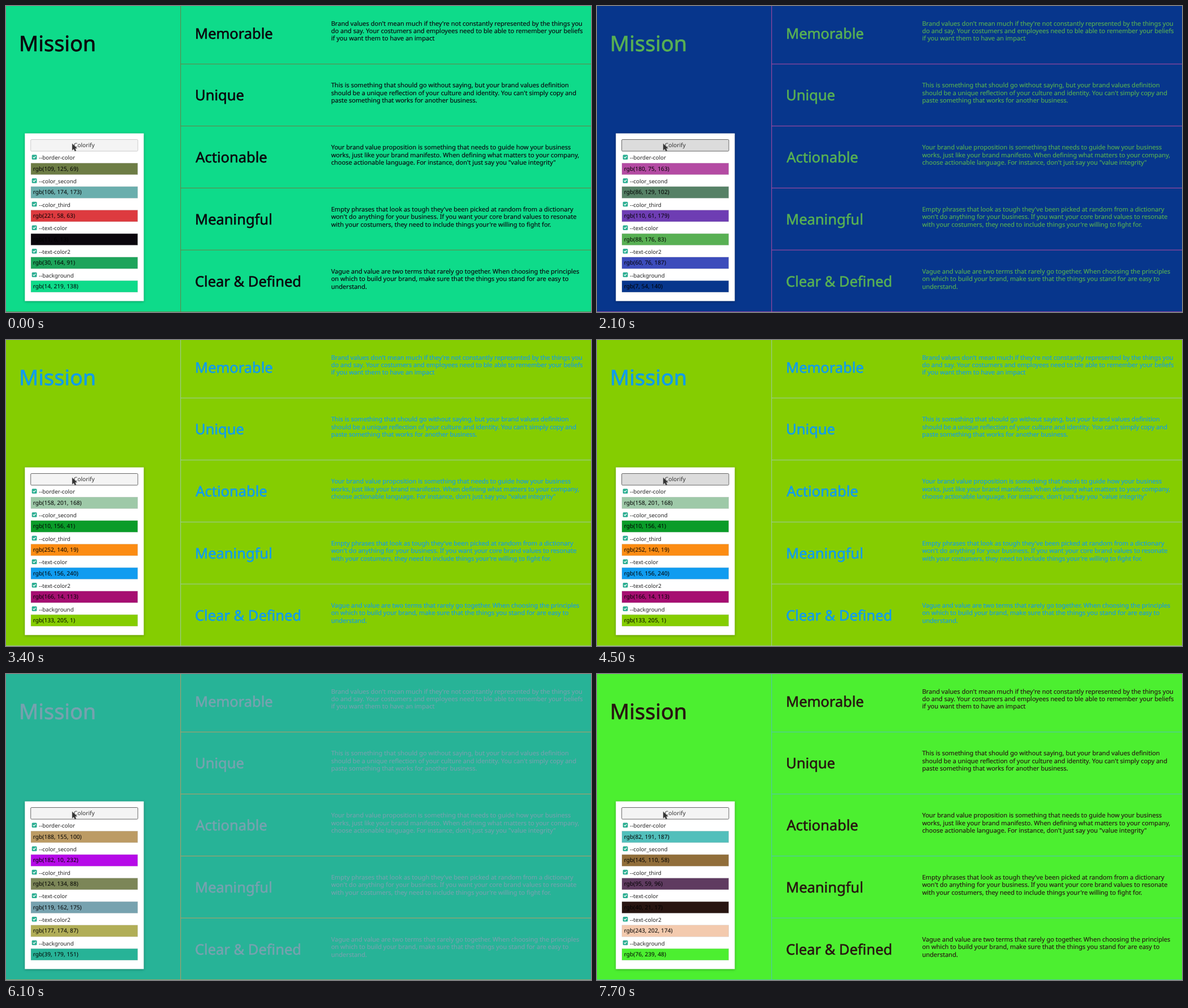
Write an HTML page that moves like this. It is 1034 px wide and 542 px high and loops after 8 s.

```html
<!DOCTYPE html>
<html lang="en">
<head>
<meta charset="utf-8">
<title>Brand values</title>
<style>
  html, body { margin: 0; width: 100%; height: 100%; overflow: hidden; }
  svg { display: block; width: 1034px; height: 542px; }
  text { font-family: "Noto Sans", "Open Sans", sans-serif; text-rendering: geometricPrecision; white-space: pre; }
  .page text { fill: var(--text); stroke: var(--text); }
  .page .heading { font-size: 25.5px; stroke-width: .6px; }
  .page .title { font-size: 37.8px; stroke-width: .7px; }
  .page .copy { font-size: 11.04px; stroke-width: .15px; }
  .rule { stroke: var(--border); fill: none; }
  .panel { fill: #fff; filter: drop-shadow(0 1px 2px rgba(0, 0, 0, .3)); }
  .label { font-size: 9.8px; fill: #222; }
  .value { font-size: 10.2px; fill: #000; }
  .swatch { stroke: rgba(190, 190, 190, .6); stroke-width: .5px; }
</style>
</head>
<body>
<svg id="stage" viewBox="0 0 1034 542"></svg>
<script>
const DURATION = 8000;
const ROW = 109.8, LINE = 13.35, FIELD = 41.65;

const sections = [
  ["Memorable",
    "Brand values don't mean much if they're not constantly represented by the things you",
    "do and say. Your costumers and employees need to ble able to remember your beliefs",
    "if you want them to have an impact"],
  ["Unique",
    "This is something that should go without saying, but your brand values definition",
    "should be a unique reflection of your culture and identity. You can't simply copy and",
    "paste something that works for another business."],
  ["Actionable",
    "Your brand value proposition is something that needs to guide how your business",
    "works, just like your brand manifesto. When defining what matters to your company,",
    "choose actionable language. For instance, don't just say you \"value integrity\""],
  ["Meaningful",
    "Empty phrases that look as tough they've been picked at random from a dictionary",
    "won't do anything for your business. If you want your core brand values to resonate",
    "with your costumers, they need to include things your're willing to fight for."],
  ["Clear & Defined",
    "Vague and value are two terms that rarely go together. When choosing the principles",
    "on which to build your brand, make sure that the things you stand for are easy to",
    "understand."]
];

const fields = ["border-color", "color_second", "color_third", "text-color", "text-color2", "background"];

// One colour per field, in the order of `fields`.
const green = ["109, 125, 69", "106, 174, 173", "221, 58, 63", "11, 6, 13", "30, 164, 91", "14, 219, 138"];
const navy = ["180, 75, 163", "86, 129, 102", "110, 61, 179", "88, 176, 83", "60, 76, 187", "7, 54, 140"];
const pink = ["37, 131, 68", "192, 136, 204", "90, 0, 105", "161, 101, 150", "223, 229, 230", "240, 154, 236"];
const lime = ["158, 201, 168", "10, 156, 41", "252, 140, 19", "16, 156, 240", "166, 14, 113", "133, 205, 1"];
const mint = ["183, 253, 96", "176, 9, 222", "104, 74, 149", "42, 122, 251", "238, 157, 97", "36, 247, 124"];
const blue = ["192, 56, 103", "188, 11, 241", "143, 194, 26", "196, 201, 99", "116, 190, 77", "41, 111, 178"];
const neon = ["82, 191, 187", "145, 110, 58", "95, 59, 96", "40, 21, 17", "243, 202, 174", "76, 239, 48"];

function blend(a, b) {
  const parse = color => color.split(",").map(Number);
  return a.map((color, i) => {
    const other = parse(b[i]);
    return parse(color).map((v, k) => Math.round((v + other[k]) / 2)).join(", ");
  });
}
const teal = blend(mint, blue);

// Start time, palette, whether the button is held down.
const steps = [
  [0, green, false],
  [800, green, true], [900, navy, false],
  [2100, navy, true], [2200, pink, false],
  [3400, lime, false],
  [4500, lime, true], [4600, mint, false],
  [5600, mint, true], [6100, teal, false],
  [6600, teal, true], [6700, blue, false],
  [7600, blue, true], [7700, neon, false]
];

const stage = document.getElementById("stage");

function add(parent, tag, attrs, content) {
  const node = document.createElementNS("http://www.w3.org/2000/svg", tag);
  for (const name in attrs) node.setAttribute(name, attrs[name]);
  if (content !== undefined) node.textContent = content;
  return parent.appendChild(node);
}

function write(parent, className, x, y, content) {
  return add(parent, "text", { class: className, x, y }, content);
}

const backdrop = add(stage, "rect", { width: 1034, height: 542 });
const page = add(stage, "g", { class: "page" });
write(page, "title", 23, 79.5, "Mission");
add(page, "path", { class: "rule", d: "M308.7 0V542M0 541.7H1034" });
sections.forEach(([heading, ...lines], i) => {
  const top = i * ROW;
  write(page, "heading", heading[0] === "A" ? 335.2 : 334, 57.5 + top, heading);
  lines.forEach((line, k) => write(page, "copy", 574.7, 34.6 + top + k * LINE, line));
  if (i < 4) add(page, "path", { class: "rule", d: `M309 ${102.8 + top}H1034` });
});

add(stage, "rect", { class: "panel", x: 33.3, y: 225.6, width: 210.2, height: 297 });
const button = add(stage, "rect", { x: 43.7, y: 236.5, width: 189.3, height: 20.6, rx: 1.5 });
const caption = write(stage, "value", 138.3, 249.7, "Colorify");
caption.setAttribute("text-anchor", "middle");
caption.style.fill = "#333";

const rows = fields.map((name, i) => {
  const row = add(stage, "g", { transform: `translate(0 ${i * FIELD})` });
  add(row, "rect", { x: 45.7, y: 263.5, width: 8.8, height: 8.5, rx: 1.5, fill: "#2cae92" });
  add(row, "path", { d: "M47.8 267.6l1.7 1.8 3-3.3", fill: "none", stroke: "#fff", "stroke-width": 1.3 });
  write(row, "label", 58, 272.4, "--" + name);
  return {
    swatch: add(row, "rect", { class: "swatch", x: 44, y: 278.2, width: 188.8, height: 20.5 }),
    value: write(row, "value", 47.7, 291.6, "")
  };
});

add(stage, "path", {
  d: "M117 243.8V255.6L119.7 253.2 121.7 257.2 124 256.2 122.2 252.3H125.6Z",
  fill: "#333", stroke: "#777", "stroke-width": .5
});

let shown;
function render(time) {
  const step = steps.filter(([start]) => start <= time).pop();
  if (step === shown) return;
  shown = step;
  const [start, palette, pressed] = step;
  const colors = palette.map(color => `rgb(${color})`);
  stage.style.setProperty("--border", colors[0]);
  stage.style.setProperty("--text", colors[3]);
  backdrop.setAttribute("fill", colors[5]);
  button.setAttribute("fill", pressed ? "#dcdcdc" : "#f4f4f4");
  button.setAttribute("stroke", start === 0 ? "#ccc" : "#666");
  rows.forEach(({ swatch, value }, i) => {
    swatch.setAttribute("fill", colors[i]);
    value.textContent = colors[i];
  });
}

const origin = performance.now();
function tick() {
  render((performance.now() - origin) % DURATION);
  requestAnimationFrame(tick);
}
tick();
</script>
</body>
</html>
```
